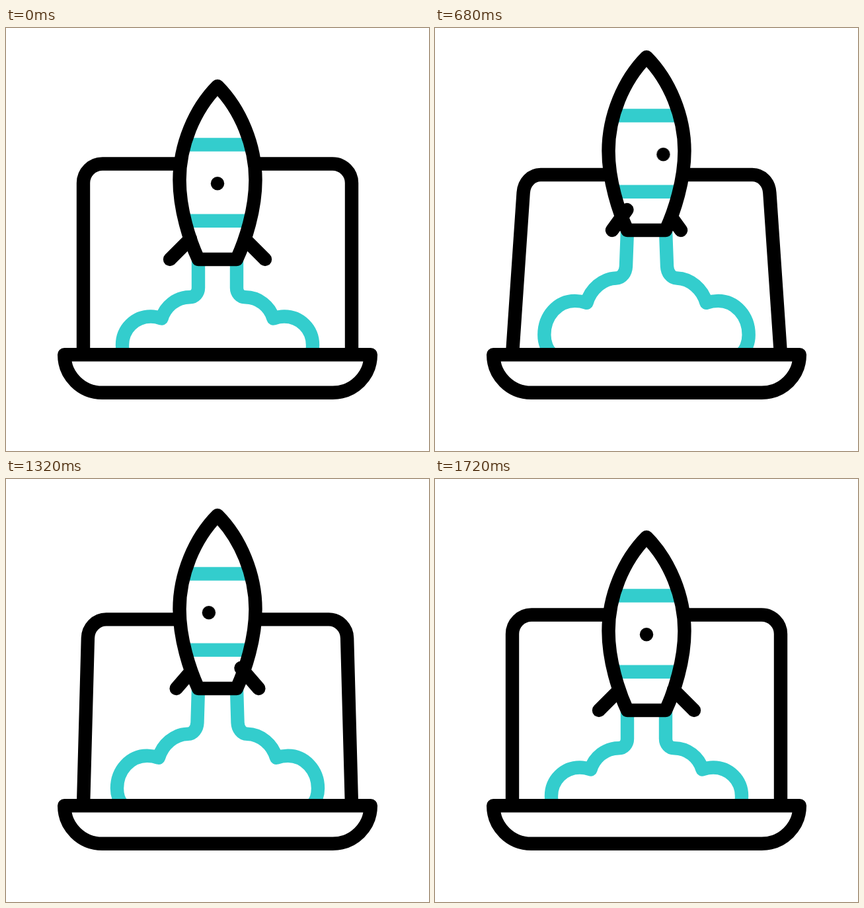
These frames come from a looping animation (640 px wide and 640 px high, 2000 ms). An HTML page:

```html
<!DOCTYPE html>
<html lang="en">
<head>
<meta charset="utf-8">
<title>Rocket launch</title>
<style>
  html, body { margin: 0; width: 100%; height: 100%; overflow: hidden; background: #fff; }
  svg { display: block; width: 100%; height: 100%; }

  svg {
    --ink: #000;
    --accent: #33cdcd;
    --soft: cubic-bezier(.5, 0, .5, 1);
    --strong: cubic-bezier(.667, 0, .333, 1);
    fill: none;
    stroke: var(--ink);
    stroke-width: 20.4;
    stroke-linecap: round;
    stroke-linejoin: round;
  }
  .accent { stroke: var(--accent); }
  .fill { fill: #fff; stroke: none; }
  .dots { fill: var(--ink); stroke: none; }

  .screen, .smoke, .rocket, .fin, .dots { animation: 2s infinite both; }
  .screen { animation-name: tilt; animation-timing-function: var(--soft); }
  .smoke { animation-name: billow; animation-timing-function: var(--strong); }
  .rocket { animation-name: lift; animation-timing-function: var(--strong); }
  .fin { animation-name: swing; animation-timing-function: var(--strong); }
  .dots { animation-name: spin; animation-timing-function: var(--soft); }

  @keyframes tilt {
    0%, 5%, 85%, 100% {
      d: path("M117 494 L117 234.5 C117 218.5 130 205.5 146 205.5 L494 205.5 C510 205.5 523 218.5 523 234.5 L523 494");
    }
    42% {
      d: path("M117 494 L135 250.5 C136 235 147 223.4 161 223.4 L479 223.4 C493 223.4 504 235 505 250.5 L523 494");
    }
  }

  @keyframes billow {
    0%, 6%, 87.5%, 100% {
      d: path("M291 350 L291 393 C291 401 285.5 407.3 278 407.3 C258 407.3 241 421 235.5 439.5 C230 437.6 224.5 436.5 219 436.5 C195 436.5 176 455.5 176 479.5 C176 485 176.5 490 178 494");
    }
    43.8%, 50% {
      d: path("M291 302.5 L288.8 358 C288.3 368 282 376.3 274 376.3 C253 377 235 393 229 414 C223 412 217 411 211 411 C185 411 164.5 434 164.5 463 C164.5 475 169 488 178 494");
    }
  }

  @keyframes lift {
    0%, 6%, 87.5%, 100% { transform: translateY(0); }
    43.8%, 50% { transform: translateY(-47.5px); }
  }

  /* One fin crosses in front of the hull, its twin crosses back behind it. */
  @keyframes swing {
    0%, 9% { d: path("M279 319 L248 350"); }
    85%, 100% { d: path("M361 319 L392 350"); }
  }
  .back { animation-direction: normal; transform: translateX(640px) scaleX(-1); }

  @keyframes spin {
    0%, 8.75% { transform: translateX(0); }
    85%, 100% { transform: translateX(126px); }
  }
</style>
</head>
<body>
<svg viewBox="0 0 640 640" aria-label="Rocket taking off from a laptop">
  <defs>
    <path id="hull" d="M320 88 C285 123 262.5 178 262.5 230 C262.5 275 278 322 291 350 H349 C362 322 377.5 275 377.5 230 C377.5 178 355 123 320 88 Z"/>
    <clipPath id="inside"><use href="#hull"/></clipPath>
  </defs>

  <path class="screen" d="M117 494 V234.5 H523 V494"/>

  <g class="accent">
    <path class="smoke" d="M291 350 V393"/>
    <g transform="matrix(-1 0 0 1 640 0)"><path class="smoke" d="M291 350 V393"/></g>
  </g>

  <path d="M88.2 494.3 A57.5 57.5 0 0 0 145.7 551.8 H494.3 A57.5 57.5 0 0 0 551.8 494.3 Z" fill="#fff"/>

  <g class="rocket">
    <path class="fin back" d="M279 319 L248 350"/>
    <use href="#hull" class="fill"/>
    <g clip-path="url(#inside)">
      <path class="accent" d="M250 176.5 H390 M250 291.8 H390"/>
      <g class="dots">
        <circle cx="320" cy="235.2" r="10.2"/>
        <circle cx="194" cy="235.2" r="10.2"/>
      </g>
    </g>
    <path class="fin" d="M279 319 L248 350"/>
    <use href="#hull"/>
  </g>
</svg>
</body>
</html>
```
